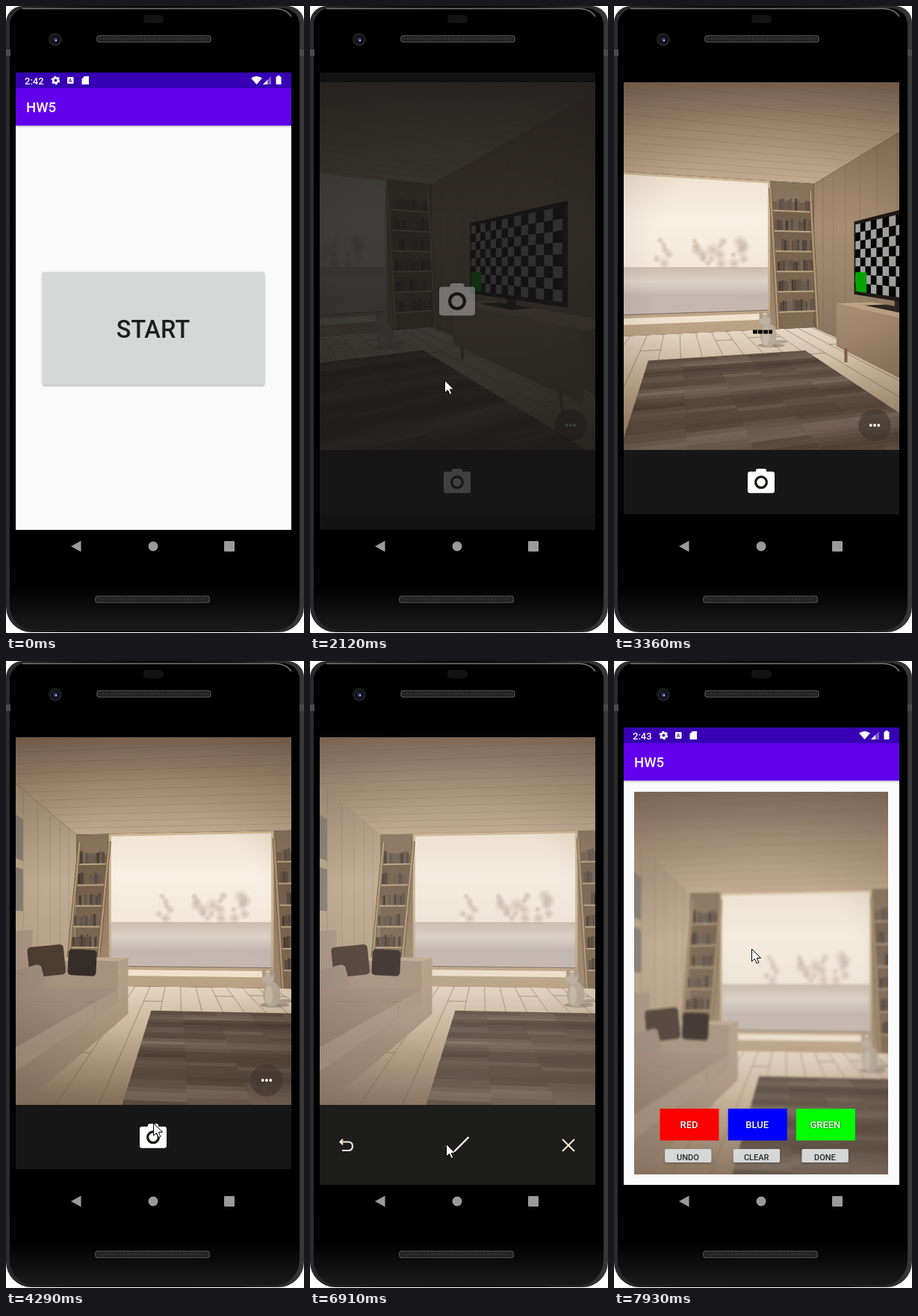
Write an HTML page with a canvas that moves like this. It is 399x839 px and loops after 8000 ms.

```html
<!DOCTYPE html>
<html lang="en">
<head>
<meta charset="utf-8">
<title>HW5 phone demo</title>
<style>
html, body { margin: 0; width: 100%; height: 100%; overflow: hidden; background: #fff; }
canvas { display: block; }
</style>
</head>
<body>
<canvas id="stage" width="399" height="839"></canvas>
<script>
const ctx = document.getElementById('stage').getContext('2d');
const LOOP = 8000, FOCAL = 450, CX = 197.5, CY = 348;
const FIRST_YAW = 27.2, MID_YAW = 14, LAST_YAW = -4.3;
const FLOOR = -.195, CEIL = .262, LEFT = -.31, RIGHT = .42;
const VIEW = [13, 102, 369, 492];
const POINTER = new Path2D('M0 0V16.5L4 13 6.6 19 9.4 18 6.8 12H12Z');

const part = (t, a, b) => Math.max(0, Math.min(1, (t - a) / (b - a)));
const ease = (t, a, b) => 1 - (1 - part(t, a, b)) ** 2;

function seeded(seed) {
  return () => (seed = (seed * 16807) % 2147483647) / 2147483647;
}

function box(g, color, x, y, w, h, r = 0) {
  g.fillStyle = color;
  g.beginPath();
  g.roundRect(x, y, w, h, r);
  g.fill();
}

function dot(g, color, x, y, rx, ry = rx) {
  g.fillStyle = color;
  g.beginPath();
  g.ellipse(x, y, rx, ry, 0, 0, 7);
  g.fill();
}

function ring(color, width, x, y, r) {
  ctx.strokeStyle = color;
  ctx.lineWidth = width;
  ctx.beginPath();
  ctx.arc(x, y, r, 0, 7);
  ctx.stroke();
}

function line(color, width, d) {
  ctx.strokeStyle = color;
  ctx.lineWidth = width;
  ctx.stroke(new Path2D(d));
}

function shape(color, d) {
  ctx.fillStyle = color;
  ctx.fill(new Path2D(d));
}

function dashed(pattern, paint) {
  ctx.setLineDash(pattern);
  paint();
  ctx.setLineDash([]);
}

function label(text, x, y, size, color, align = 'center') {
  ctx.font = `500 ${size}px Roboto, sans-serif`;
  ctx.textAlign = align;
  ctx.fillStyle = color;
  ctx.fillText(text, x, y);
}

function fade(g, x0, y0, x1, y1, ...colors) {
  const grad = g.createLinearGradient(x0, y0, x1, y1);
  colors.forEach((c, i) => grad.addColorStop(i / (colors.length - 1), c));
  return grad;
}

function glow(g, color, x, y, r) {
  const grad = g.createRadialGradient(x, y, 0, x, y, r);
  grad.addColorStop(0, `rgba(${color},.45)`);
  grad.addColorStop(1, `rgba(${color},0)`);
  dot(g, grad, x, y, r);
}

// The room in perspective, seen by a camera turned by the yaw in degrees
function room(g, yaw) {
  const rnd = seeded(77), angle = yaw * Math.PI / 180, s = Math.sin(angle), c = Math.cos(angle);
  const view = ([x, y, z]) => [x * c - z * s, y, x * s + z * c];
  const flat = ([x, y, z]) => [CX + FOCAL * x / z, CY - FOCAL * y / z];
  const down = (y0, y1, ...colors) => fade(g, 0, y0, 0, y1, ...colors);

  // Outline of a polygon, cut at the near plane
  function trace(points) {
    const near = .06, pts = points.map(view);
    g.beginPath();
    pts.forEach((p, i) => {
      const q = pts[(i + 1) % pts.length];
      if (p[2] > near) g.lineTo(...flat(p));
      if ((p[2] > near) !== (q[2] > near)) {
        const u = (near - p[2]) / (q[2] - p[2]);
        g.lineTo(...flat(p.map((v, j) => v + (q[j] - v) * u)));
      }
    });
    g.closePath();
  }
  const face = (color, ...pts) => { g.fillStyle = color; trace(pts); g.fill(); };
  const edge = (color, width, ...pts) => { g.strokeStyle = color; g.lineWidth = width; trace(pts); g.stroke(); };
  const wall = (color, x0, x1, y0, y1, z = 1) =>
    face(color, [x0, y0, z], [x1, y0, z], [x1, y1, z], [x0, y1, z]);
  const side = (color, x, y0, y1, z0, z1) =>
    face(color, [x, y0, z0], [x, y0, z1], [x, y1, z1], [x, y1, z0]);
  const deck = (color, y, x0, x1, z0, z1) =>
    face(color, [x0, y, z0], [x1, y, z0], [x1, y, z1], [x0, y, z1]);
  // Draw upright artwork at a point in the room
  function stand(point, art) {
    const p = view(point);
    if (p[2] < .1) return;
    g.save();
    g.translate(...flat(p));
    g.scale(1 / p[2], 1 / p[2]);
    art();
    g.restore();
  }

  function shell() {
    deck(down(102, 235, '#7f6856', '#a58d75', '#c2aa8e'), CEIL, LEFT, RIGHT, .05, 1);
    for (let z = .36; z < 1; z *= 1.07)
      edge('rgba(70,48,30,.1)', .6, [LEFT, CEIL, z], [RIGHT, CEIL, z]);
    deck(down(425, 594, '#e9dcc7', '#c0aa90', '#8f7a64'), FLOOR, LEFT, RIGHT, .05, 1);
    for (let x = LEFT; x < RIGHT; x += .045) {
      const z = .3 + rnd() * .6;
      edge('rgba(95,72,48,.3)', .8, [x, FLOOR, .1], [x, FLOOR, 1]);
      edge('rgba(95,72,48,.3)', .8, [x, FLOOR, z], [x + .045, FLOOR, z]);
    }
    side(down(150, 440, '#a18a73', '#c0ac92', '#b39e85'), LEFT, FLOOR, CEIL, .05, 1);
    side(down(150, 440, '#876d58', '#a68d73', '#8d7761'), RIGHT, FLOOR, CEIL, .05, 1);
    for (let z = .3; z < 1; z += .07)
      for (const x of [LEFT, RIGHT])
        edge('rgba(80,58,38,.1)', .7, [x, FLOOR, z], [x, CEIL, z]);
    wall(down(230, 432, '#86705a', '#a18a70'), LEFT, RIGHT, FLOOR, CEIL);
  }

  function windowPane() {
    wall(down(226, 435, '#cdb795', '#cdb795', '#b9a283'), -.21, .275, FLOOR, CEIL);
    wall('#efe3cd', -.21, .275, -.164, -.146);
    wall(down(226, 350, '#efe3d0', '#f9f0e4', '#f2e7da'), -.203, .268, -.01, .255);
    wall(down(350, 408, '#c9bcaf', '#dcd1c6', '#c2b6b0', '#c4b8b0'), -.203, .268, -.136, -.003);
    for (const x of [-.043, .063, .117, .178])
      for (let i = 0; i < 6; i++) {
        const p = flat(view([x + (rnd() - .5) * .045, .008 + i * .013, 1]));
        glow(g, '168,150,132', ...p, 5 + rnd() * 6);
      }
    edge('#85756a', 1.2, [-.203, -.136, 1], [.268, -.136, 1]);
  }

  function ladder(x0, x1, lean) {
    const shift = y => lean * (.24 - y) / .435;
    face('rgba(82,62,44,.4)', [x0, .2, 1], [x1, .2, 1], [x1 + lean, FLOOR, 1], [x0 + lean, FLOOR, 1]);
    for (let i = 0; i < 6; i++) {
      const y = .172 - i * .063, a = x0 + shift(y), b = x1 + shift(y);
      for (let x = a + .008; x < b - .012; x += .0085) {
        const v = 58 + rnd() * 45 | 0;
        if (rnd() > .12) wall(`rgb(${v + 12},${v},${v - 10})`, x, x + .0075, y, y + .03 + rnd() * .01);
      }
      edge('#bda583', 2, [a, y, 1], [b, y, 1]);
    }
    for (const x of [x0, x1])
      for (const [color, width] of [['#6e573f', 4.5], ['#af9675', 2.7]])
        edge(color, width, [x, .24, 1], [x + lean, FLOOR, 1]);
  }

  function rug() {
    const x0 = -.06, x1 = .285;
    deck('#5f5045', FLOOR, x0, x1, .12, .73);
    for (let z = .72; z > .15; z *= .975) {
      const light = Math.sin(z * 37) + Math.sin(z * 83 + 1);
      for (let x = x0; x < x1 - .001; x += .069) {
        const v = light * .13 + (rnd() - .5) * .2;
        deck(v > 0 ? `rgba(190,172,155,${v})` : `rgba(35,24,18,${-v})`, FLOOR, x, x + .069, z * .975, z);
      }
    }
  }

  function cabinet() {
    deck('#bda283', -.08, .33, RIGHT, .3, .662);
    side(down(395, 510, '#a98f74', '#8b735b'), .33, -.172, -.08, .3, .662);
    for (const z of [.345, .63]) edge('#7a5f45', 4, [.335, -.17, z], [.33, FLOOR, z - .01]);
  }

  function television() {
    const cols = 14, rows = 8, dz = .297 / cols, dy = .154 / rows, z0 = .702, y0 = -.058;
    deck('#2a2520', -.078, .36, .41, .49, .6);
    side('#2a2520', .4, -.078, -.06, .53, .56);
    side('#1d1916', .399, -.066, .104, .394, .71);
    for (let i = 0; i < cols; i++)
      for (let j = 0; j < rows; j++)
        side((i + j) % 2 ? '#a2a2a2' : '#050505', .398, y0 + j * dy, y0 + (j + 1) * dy, z0 - i * dz, z0 - (i + 1) * dz);
    side('#00a300', .398, y0, y0 + 2.3 * dy, z0, z0 - 2.2 * dz);
  }

  function cat() {
    dot(g, 'rgba(80,60,40,.35)', 3, -1, 15, 2.5);
    dot(g, '#b0a291', 13, -5, 8, 2);
    dot(g, '#b8aa98', 0, -12, 9, 13);
    dot(g, '#c8bba9', -3, -11, 4, 10);
    dot(g, '#bfb19f', -4, -29, 6.5, 6);
    for (const x of [-8, 0]) dot(g, '#ab9d8b', x, -34, 2, 4);
  }

  // The sofa stands at a slight angle to the wall
  function sofa() {
    const p = (x, y, z) => [x + .17 * (z - .7), y, z], front = -.106;
    function block(x0, x1, y0, y1, z0, z1, top, face1, face2) {
      face(face1, p(x1, y0, z0), p(x1, y0, z1), p(x1, y1, z1), p(x1, y1, z0));
      face(top, p(x0, y1, z0), p(x1, y1, z0), p(x1, y1, z1), p(x0, y1, z1));
      face(face2, p(x0, y0, z0), p(x1, y0, z0), p(x1, y1, z0), p(x0, y1, z0));
    }
    const skirt = down(430, 594, '#b59e87', '#947d69');
    block(-.3, front, FLOOR, -.077, .64, .7, '#c0aa92', skirt, '#a8927d');
    block(-.45, -.27, FLOOR, -.017, .1, .63, '#b9a693', '#a99582', '#a99582');
    block(-.3, front, FLOOR, -.155, .1, .64, '#8b7564', skirt, '#8b7564');
    for (const [z0, z1] of [[.53, .64], [.1, .53]])
      block(-.28, front, -.155, -.13, z0, z1, down(430, 560, '#a58f7d', '#8d7766'), '#ab9580', '#806a59');
    const pillow = (color, w, h, tilt) => () => {
      g.rotate(tilt);
      box(g, color, -w / 2, -h / 2, w, h, 3);
    };
    stand([-.242, -.073, .6], pillow('#4c3d33', 30, 25, -.1));
    stand([-.181, -.078, .62], pillow('#352d29', 24, 22, .05));
    stand([-.24, -.09, .5], pillow('#a08d7c', 30, 15, -.25));
  }

  g.save();
  g.beginPath();
  g.rect(...VIEW);
  g.clip();
  shell();
  windowPane();
  ladder(-.3, -.208, -.042);
  ladder(.276, .408, .025);
  rug();
  for (const y of [.02, .12]) side('#877d73', LEFT, y, y + .083, .45, .65);
  cabinet();
  television();
  stand([.213, FLOOR, .79], cat);
  sofa();
  const shade = g.createRadialGradient(CX, CY, 150, CX, CY, 340);
  shade.addColorStop(0, 'rgba(50,30,15,0)');
  shade.addColorStop(1, 'rgba(50,30,15,.25)');
  box(g, shade, ...VIEW);
  g.restore();
}

function capture(blur) {
  const sheet = document.createElement('canvas');
  sheet.width = 399;
  sheet.height = 839;
  const g = sheet.getContext('2d');
  room(g, LAST_YAW);
  g.filter = `blur(${blur}px)`;
  g.drawImage(sheet, 0, 0);
  g.filter = 'none';
  box(g, 'rgba(200,194,186,.1)', ...VIEW);
  return sheet;
}
const photo = capture(.7), thumb = capture(1.4);

function phone() {
  box(ctx, '#fff', 0, 0, 399, 839);
  box(ctx, fade(ctx, 0, 0, 399, 0, '#2c2c2c', '#101010', '#080808', '#101010', '#383838'), 0, 0, 399, 838, [22, 22, 34, 34]);
  box(ctx, fade(ctx, 0, 775, 0, 838, '#000', '#1b1b1b'), 5, 3, 388, 833, [22, 22, 34, 34]);
  line('#777', 1.5, 'M22 3.5H360Q376 4 382 14');
  for (const x of [0, 393]) box(ctx, '#4a4a4a', x, 58, 6, 9);
  box(ctx, '#131313', 184, 12, 27, 11, 5);
  for (const [x, y] of [[121, 39], [119, 789]]) {
    box(ctx, '#444', x, y, 154, 10, 4);
    box(ctx, '#1d1d1d', x + 1.5, y + 1.5, 151, 7, 3);
    dashed([1, 1.5], () => line('#3c3c3c', 4, `M${x + 4} ${y + 5}h146`));
  }
  ['#1e1e20', '#11111a', '#2f2d50'].forEach((color, i) => dot(ctx, color, 66, 45, 9 - 3 * i));
  dot(ctx, '#b9b5dc', 67, 46, 1.2);
  box(ctx, '#000', 13, 89, 369, 640);
  shape('#9b9b9b', 'M87 723L100.500 715.500V730.500Z');
  dot(ctx, '#9b9b9b', 197, 723, 6.5);
  box(ctx, '#9b9b9b', 292, 716, 14, 14, 1);
}

function appFrame(clock) {
  box(ctx, '#fafafa', 13, 110, 369, 591);
  box(ctx, fade(ctx, 0, 160, 0, 163, 'rgba(0,0,0,.25)', 'rgba(0,0,0,0)'), 13, 160, 369, 3);
  box(ctx, '#3700b3', 13, 89, 369, 21);
  box(ctx, '#6200ee', 13, 110, 369, 50);
  label(clock, 25, 104.5, 13, '#fff', 'left');
  label('HW5', 27, 142, 18.5, '#fff', 'left');
  dashed([2.6, 2.2], () => ring('#fff', 2.5, 66.4, 99.5, 4.6));
  ring('#fff', 2.6, 66.4, 99.5, 3.2);
  box(ctx, '#fff', 82, 95, 8.5, 9, 1);
  label('A', 86.2, 102.3, 7, '#3700b3');
  shape('#fff', 'M105 94H111V105H101.500V97.500Z');
  shape('#fff', 'M328 96.500Q335.500 91.500 343 96.500L335.500 105Z');
  shape('rgba(255,255,255,.35)', 'M344 105L355 94V105Z');
  shape('#fff', 'M344 105L350 99V105Z');
  box(ctx, '#fff', 361.5, 94.5, 7, 10.5, 1);
  box(ctx, '#fff', 363.5, 93, 3, 2);
}

function grayButton(x, y, w, h) {
  ctx.save();
  ctx.shadowColor = 'rgba(0,0,0,.35)';
  ctx.shadowBlur = 3;
  ctx.shadowOffsetY = 1;
  box(ctx, '#d6d7d7', x, y, w, h, 2);
  ctx.restore();
}

function home(t) {
  appFrame('2:42');
  grayButton(49, 356, 297, 151);
  if (t > 1050) {
    ctx.save();
    ctx.beginPath();
    ctx.rect(49, 356, 297, 151);
    ctx.clip();
    dot(ctx, 'rgba(0,0,0,.14)', 144, 409, 40 + 210 * ease(t, 1050, 1400));
    ctx.restore();
  }
  label('START', 197, 444, 32.5, '#1e1e1e');
}

// Camera symbol around its lens centre, in units of 1/24 of its size
function cameraIcon(x, y, k, color) {
  ctx.save();
  ctx.translate(x, y);
  ctx.scale(k, k);
  box(ctx, color, -10, -8, 20, 16, 1.7);
  box(ctx, color, -4, -10, 8, 2, [1.5, 1.5, 0, 0]);
  ring('#191817', 1.8, 0, 0, 4.1);
  ctx.restore();
}

function cameraScreen(t) {
  box(ctx, '#000', 13, 89, 369, 612);
  room(ctx, FIRST_YAW + (MID_YAW - FIRST_YAW) * part(t, 2980, 3360) + (LAST_YAW - MID_YAW) * part(t, 3360, 3590));
  if (t > 3200 && t < 3590) dashed([6, 1], () => line('#000', 5, 'M186 436H212'));
  dot(ctx, 'rgba(62,52,45,.6)', 349, 561, 21.5);
  for (const i of [-1, 0, 1]) dot(ctx, '#fff', 349 + i * 5.3, 561, 1.9);
  box(ctx, '#171717', 13, 594, 369, 86);
  cameraIcon(197, 637.3, 1.8, '#fff');
  const veil = 1 - .18 * part(t, 1820, 2120) - .82 * part(t, 2120, 2540);
  if (veil > 0) {
    box(ctx, `rgba(23,23,23,${veil})`, 13, 89, 369, 612);
    ctx.globalAlpha = Math.min(1, veil * 2);
    cameraIcon(197, 395, 2.4, `rgba(200,200,200,${veil ** 3 * .85})`);
    ctx.globalAlpha = 1;
  }
}

function review() {
  ctx.drawImage(photo, ...VIEW, ...VIEW);
  box(ctx, '#1d1d1b', 13, 594, 369, 107);
  line('#f3eadc', 2.2, 'M44 640L40.500 643.500 44 647M41 643.500H51Q57 643.500 57 649.300T51 655H43');
  line('#fdf3e6', 2.4, 'M182 648.500L191.500 658 212.500 637');
  line('#f3eadc', 2, 'M338 640L354 656M354 640L338 656');
}

function paint() {
  appFrame('2:43');
  ctx.drawImage(thumb, ...VIEW, 27, 175, 340, 512);
  ['RED', 'BLUE', 'GREEN'].forEach((name, i) => {
    const x = 61.5 + 91.2 * i;
    box(ctx, ['#f00', '#00f', '#0f0'][i], x, 599, 79, 42.5);
    ctx.save();
    ctx.shadowColor = 'rgba(0,0,0,.8)';
    ctx.shadowBlur = 2;
    label(name, x + 39, 625, 13, '#fff');
    ctx.restore();
  });
  ['UNDO', 'CLEAR', 'DONE'].forEach((name, i) => {
    const x = 68 + 91.7 * i;
    grayButton(x, 653, 62.5, 18);
    label(name, x + 31, 668, 11, '#2a2a2a');
  });
}

// Mouse strokes: start time, end time, destination
const STROKES = [
  [70, 480, 124, 390], [480, 900, 144, 409], [1820, 2120, 180.5, 501], [2120, 2810, 170, 458],
  [3830, 4290, 197.5, 618.5], [4680, 5140, 87, 514], [5140, 5450, 133, 465], [5520, 5700, 246, 560],
  [5700, 5910, 200, 633], [6450, 6910, 182.5, 646.5], [6990, 7700, 184.5, 385.5]];

function pointer(t) {
  if (t < 70 || (t > 2980 && t < 3830)) return;
  let x = 312, y = 752;
  for (const [from, to, x1, y1] of STROKES) {
    const u = part(t, from, to);
    x += (x1 - x) * u;
    y += (y1 - y) * u;
  }
  ctx.save();
  ctx.translate(x, y);
  ctx.fillStyle = '#fff';
  ctx.strokeStyle = '#000';
  ctx.lineWidth = 1;
  ctx.fill(POINTER);
  ctx.stroke(POINTER);
  ctx.restore();
}

function slideIn(amount, top, rise, content) {
  ctx.save();
  ctx.globalAlpha = amount;
  ctx.translate(0, top + (1 - amount) * rise);
  content();
  ctx.restore();
}

function splash() {
  box(ctx, '#171717', 13, 89, 369, 612);
  cameraIcon(197, 395, 2.4, '#b5b5b5');
}

function draw(t) {
  phone();
  ctx.save();
  ctx.beginPath();
  ctx.rect(13, 89, 369, 612);
  ctx.clip();
  if (t < 1820) {
    home(t);
    if (t > 1350) slideIn(ease(t, 1350, 1590), 4, 60, splash);
  } else {
    if (t < 4950) cameraScreen(t);
    if (t > 4760) slideIn(ease(t, 4760, 4950), 0, 0, review);
    if (t > 7300) slideIn(ease(t, 7300, 7900), 0, 50, paint);
  }
  ctx.restore();
  pointer(t);
}

const start = performance.now();
function tick() {
  draw((performance.now() - start) % LOOP);
  requestAnimationFrame(tick);
}
tick();
</script>
</body>
</html>
```
